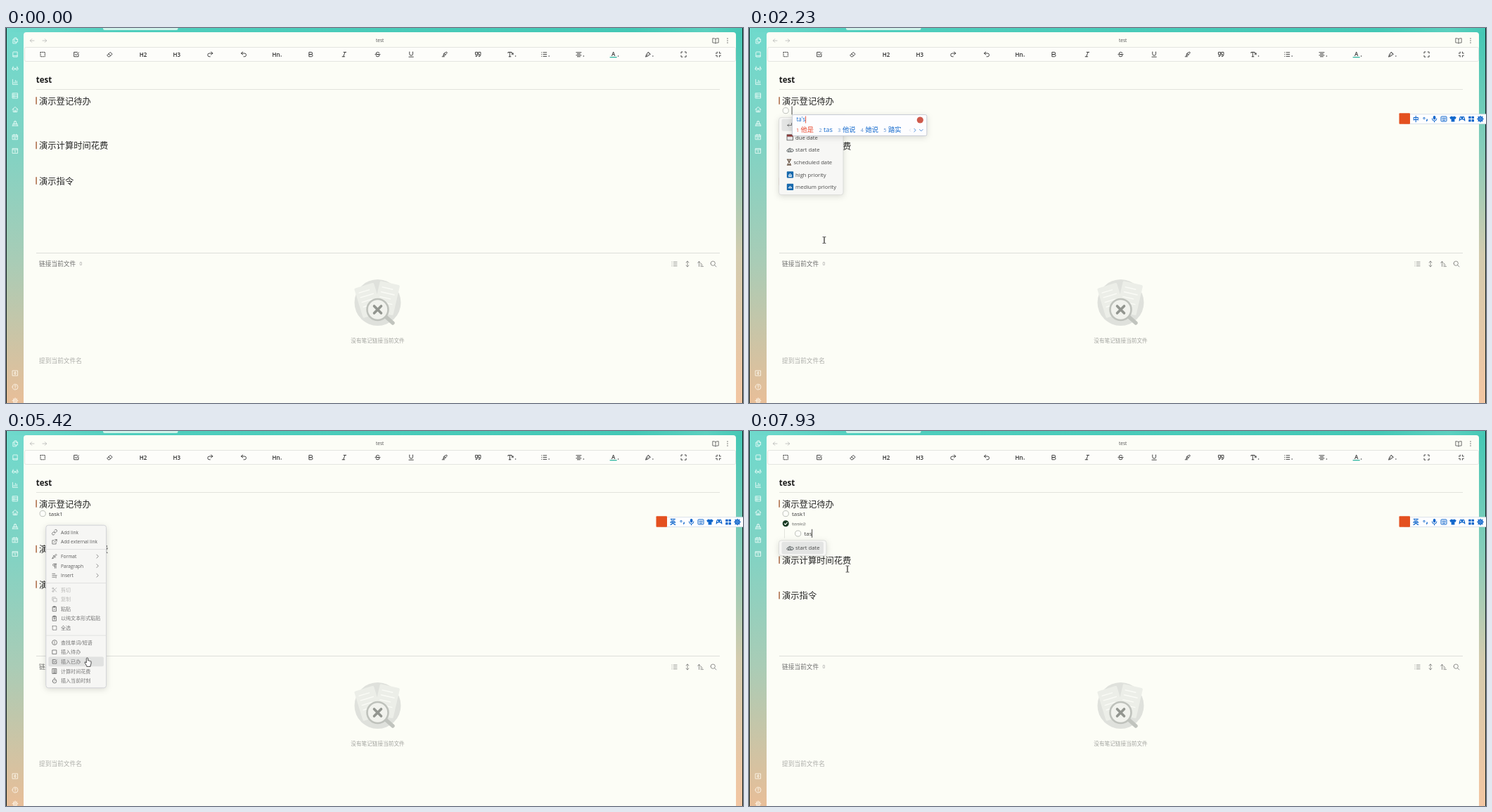
These frames come from a looping animation (1048 by 534 pixels, 7.99 s). An HTML page:

```html
<!DOCTYPE html>
<html lang="zh-CN">
<head>
<meta charset="utf-8">
<title>Note editor</title>
<style>
html, body { margin: 0; width: 100%; height: 100%; overflow: hidden; background: #fcfdf6; }
svg { display: block; width: 1048px; height: 534px; }
text { font-family: "Open Sans", "Noto Sans CJK SC", "Noto Sans CJK", sans-serif; white-space: pre; }
.pop { filter: drop-shadow(0 2px 4px #0002); }
</style>
</head>
<body>
<svg viewBox="0 0 1048 534">
  <defs>
    <linearGradient id="left" x2="0" y2="1">
      <stop offset="0" stop-color="#70d9cc"/><stop offset=".3" stop-color="#7fd3c4"/>
      <stop offset=".62" stop-color="#a9ccb6"/><stop offset="1" stop-color="#e8be98"/>
    </linearGradient>
    <linearGradient id="right" x2="0" y2="1">
      <stop offset="0" stop-color="#45c8b5"/><stop offset=".3" stop-color="#83cdba"/>
      <stop offset=".6" stop-color="#d3cbae"/><stop offset="1" stop-color="#f3c6a2"/>
    </linearGradient>
    <linearGradient id="top">
      <stop offset="0" stop-color="#70d9cc"/><stop offset=".16" stop-color="#4fcebd"/>
      <stop offset=".85" stop-color="#43c8b5"/><stop offset=".95" stop-color="#5bd0bf"/><stop offset="1" stop-color="#45c8b5"/>
    </linearGradient>
  </defs>
  <g id="page"></g>
  <g id="live"></g>
</svg>
<script>
const LOOP = 7990;
const INK = '#2b2b2b', BLUE = '#1268cc';
const page = document.getElementById('page'), live = document.getElementById('live');
const ruler = document.createElement('canvas').getContext('2d');

// Drawing helpers: every one returns SVG markup. Text is placed by its vertical centre.
const rect = (x, y, w, h, fill, extra = '') => `<rect x="${x}" y="${y}" width="${w}" height="${h}" fill="${fill}" ${extra}/>`;
const disc = (x, y, r, fill, extra = '') => `<circle cx="${x}" cy="${y}" r="${r}" fill="${fill}" ${extra}/>`;
const path = (d, stroke, width = 1, extra = '') =>
  `<path d="${d}" fill="none" stroke="${stroke}" stroke-width="${width}" stroke-linecap="round" stroke-linejoin="round" ${extra}/>`;
const text = (x, y, str, size, fill = INK, extra = '') =>
  `<text x="${x}" y="${y + size * .37}" font-size="${size}" fill="${fill}" ${extra}>${str}</text>`;
const icon = (d, x, y, size, stroke, width = 2, extra = '') =>
  `<g transform="translate(${x - size / 2} ${y - size / 2}) scale(${size / 24})">${path(d, stroke, width, extra)}</g>`;
const ring = (x, y, r) => `M${x - r} ${y}a${r} ${r} 0 1 0 ${2 * r} 0a${r} ${r} 0 1 0 ${-2 * r} 0`;
const textWidth = (str, size) => { ruler.font = `${size}px "Open Sans", sans-serif`; return ruler.measureText(str).width; };

// Icons on a 24 unit grid
const I = {
  files: 'M15 2h-6v15h12V8zM15 2v6h6M9 7H4v15h12v-5',
  book: 'M4 19V5a2 2 0 0 1 2-2h14v18H6a2 2 0 0 1 0-4h14',
  glasses: ring(6, 15, 4) + ring(18, 15, 4) + 'M10 14h4M2 14l3-8M22 14l-3-8',
  chart: 'M3 3v18h18M8 17v-4M13 17V6M18 17v-8',
  drawers: 'M3 3h18v18H3zM3 9h18M3 15h18M7 6h1M7 12h1M7 18h1',
  home: 'M2 12l10-9 10 9M5 10v11h14V10M10 21v-6h4v6',
  stamp: 'M2 21h20M4 21v-7h16v7M8 14V6h8v8M12 6V3M9 17v1M15 17v1',
  calendar: 'M3 5h18v16H3zM3 10h18M8 2v5M16 2v5M8 14h1M12 14h1M16 14h1M8 17h1M12 17h1',
  day: 'M3 4h18v17H3zM3 8h18M11 12l1-1v7',
  vault: 'M3 3h18v18H3z' + ring(12, 12, 3) + 'M12 6v3M12 15v3',
  help: ring(12, 12, 10) + 'M9 9a3 3 0 1 1 4 3q-1 .6-1 2M12 17v.5',
  gear: ring(12, 12, 3) + ring(12, 12, 7) + 'M12 2v3M12 19v3M2 12h3M19 12h3M5 5l2 2M17 17l2 2M5 19l2-2M17 7l2-2',
  back: 'M21 12H4M11 5l-7 7 7 7', forward: 'M3 12h17M13 5l7 7-7 7',
  openBook: 'M12 6q-3-2-10-2v15q7 0 10 2q3-2 10-2V4q-7 0-10 2v15',
  dots: 'M12 4v.2M12 12v.2M12 20v.2',
  square: 'M4 4h16v16H4z',
  check: 'M20 11v9H4V4h12M8 11l4 4L21 5',
  eraser: 'M3 15L14 4l7 7-9 9H8zM8 10l7 7',
  redo: 'M15 3l6 5-6 5M21 8H9a6 6 0 0 0 0 12h3', undo: 'M9 3L3 8l6 5M3 8h12a6 6 0 0 1 0 12h-3',
  bold: 'M7 4h7a4 4 0 0 1 0 8H7zM7 12h8a4 4 0 0 1 0 8H7z',
  italic: 'M10 4h9M5 20h9M15 4L9 20',
  strike: 'M18 7q-1-3-6-3t-6 4q0 2 4 4h4q4 1 4 4 0 4-6 4t-6-4M3 12h18',
  underline: 'M6 3v7a6 6 0 0 0 12 0V3M4 21h16',
  marker: 'M3 20h8M7 16l3-8 9-5 2 3-7 8zM10 9l5 5',
  quote: 'M3 4h7v9q0 6-6 7v-4q2 0 2-4H3zM14 4h7v9q0 6-6 7v-4q2 0 2-4h-3z',
  type: 'M3 7V4h13v3M9 4v16M6 20h7M16 13l5-5M21 13V8h-5',
  list: 'M9 5h12M9 12h12M9 19h12M3 5h.5M3 12h.5M3 19h.5',
  center: 'M3 5h18M7 10h10M3 15h18M7 20h10',
  bucket: 'M4 20l3-9 6-7 7 7-7 6zM7 17l5-5M13 4l7 7',
  expand: 'M3 8V3h5M16 3h5v5M21 16v5h-5M8 21H3v-5', shrink: 'M3 8h5V3M16 3v5h5M21 16h-5v5M8 21v-5H3',
  upDown: 'M12 2v20M7 7l5-5 5 5M7 17l5 5 5-5',
  sort: 'M7 21V3M2 8l5-5 5 5M13 11h3M13 16h6M13 21h9',
  search: ring(10, 10, 8) + 'M16 16l6 6',
  link: 'M10 13a5 5 0 0 0 7 0l4-4a5 5 0 0 0-7-7l-2 2M14 11a5 5 0 0 0-7 0l-4 4a5 5 0 0 0 7 7l2-2',
  external: 'M14 3h7v7M21 3L10 14M18 14v7H3V6h7',
  brush: 'M3 21q1-8 7-10l8-8 3 3-8 8q-2 6-10 7M7 8l9 9',
  pilcrow: 'M13 4v17M18 4v17M20 4H9a4 4 0 0 0 0 8h4',
  insert: 'M3 5h11M3 12h18M3 19h11M18 16v6',
  cut: ring(6, 6, 3) + ring(6, 18, 3) + 'M20 4L8 16M8 8l12 12',
  copy: 'M8 8h13v13H8zM4 16H3V3h13v1',
  paste: 'M5 4h14v18H5zM9 2h6v4H9zM9 14l2 2 4-4', pasteText: 'M5 4h14v18H5zM9 2h6v4H9zM9 11h6M12 11v7',
  info: ring(12, 12, 10) + 'M12 11v6M12 7v.5',
  calc: 'M4 2h16v20H4zM8 6h8M8 11h8M8 15h8M8 19h8',
  timer: ring(12, 14, 8) + 'M10 2h4M12 14l3-3',
  chevron: 'M8 3l9 9-9 9',
  enter: 'M21 4v9H4M9 8l-5 5 5 5',
  clouds: 'M3 18a4 4 0 0 1 3-7 6 6 0 0 1 11-1 4 4 0 0 1 4 8zM8 17a4 4 0 1 1 7 0',
  hourglass: 'M5 2h14M5 22h14M7 2q0 7 5 10-5 3-5 10M17 2q0 7-5 10 5 3 5 10M9 20h6M10 7h4'
};

function drawPage() {
  const out = [
    rect(0, 0, 1048, 534, 'url(#top)'), rect(0, 6, 60, 528, 'url(#left)'), rect(1000, 6, 48, 528, 'url(#right)'),
    rect(0, 0, 1, 534, '#10201e'), rect(1047, 0, 1, 534, '#10201e'),
    rect(138, -4, 106.5, 7, '#d0f3ea', 'rx="2.5"'),
    '<path d="M25 534V10a4 4 0 0 1 4-4H1034a4 4 0 0 1 4 4V534z" fill="#fcfdf6"/>',
    rect(26.5, 27.5, 1011, 20, '#fdfdfa', 'rx="2" stroke="#dfe0dc" stroke-width=".8"'),
    rect(43, 87, 972, 1, '#e2e3dd'), rect(43, 320, 972, 1, '#dddeda')
  ];
  ['files', 'book', 'glasses', 'chart', 'drawers', 'home', 'stamp', 'calendar', 'day'].forEach((name, i) =>
    out.push(icon(I[name], 13, 18 + 19.6 * i, 9.5, '#f3fffc', 2)));
  ['vault', 'help', 'gear'].forEach((name, i) => out.push(icon(I[name], 13, 491.5 + 19.6 * i, 9.5, '#fffaf0', 2)));

  out.push(icon(I.back, 37, 18, 8, '#aaa'), icon(I.forward, 55, 18, 8, '#aaa'),
    text(531.7, 18, 'test', 6.5, '#555', 'text-anchor="middle"'),
    icon(I.openBook, 1009, 18, 10, '#555'), icon(I.dots, 1026, 18, 9, '#444', 3.4));

  const tools = ['square', 'check', 'eraser', '=H2', '=H3', 'redo', 'undo', '=Hn', 'bold', 'italic', 'strike', 'underline',
    'marker', 'quote', 'type', 'list', 'center', '=A', 'bucket', 'expand', 'shrink'];
  const withMenu = ['=Hn', 'type', 'list', 'center', '=A', 'bucket'];
  tools.forEach((name, i) => {
    const x = 52.2 + 48.03 * i - (i < 15 ? .4 * i : 6 - (i - 15) * 1.2);
    const menu = withMenu.includes(name), cx = menu ? x - 1.5 : x;
    if (name[0] === '=') {
      const letters = name.slice(1);
      out.push(text(cx, letters === 'A' ? 36.8 : 37.6, letters, 8, INK, 'text-anchor="middle" font-weight="600"'));
      if (letters === 'A') out.push(rect(cx - 5, 41, 10, 1.3, '#2fb5a0'));
    } else out.push(icon(I[name], cx, 37.6, 9.5, INK, 2.2, name === 'square' ? 'stroke-dasharray="2.6 3.4"' : ''));
    if (menu) out.push(disc(cx + 7, 40, .8, '#444'));
  });

  out.push(text(42.7, 74, 'test', 11.5, '#1c1c1c', 'font-weight="700"'),
    text(47, 335.5, '链接当前文件', 8.7, '#707070'), text(104.5, 335.3, '0', 6.6, '#999'),
    text(528.5, 445, '没有笔记链接当前文件', 7.65, '#a3a4a0', 'text-anchor="middle"'),
    text(47, 473.5, '提到当前文件名', 8.7, '#adaeaa'));
  ['list', 'upDown', 'sort', 'search'].forEach((name, i) => out.push(icon(I[name], 950.5 + 18.5 * i, 336, 9.5, '#6a6a6a', 1.8)));

  // Empty-state picture
  const sheet = (x, y, turn) => `<g transform="translate(${x} ${y}) rotate(${turn})">` +
    rect(0, 0, 29, 44, '#eceee8', 'rx="2"') + [8, 15, 22, 29].map(v => path(`M5 ${v}h${v % 2 ? 19 : 15}`, '#fafbf6', 1.4)).join('') + '</g>';
  out.push(disc(528.5, 391, 33, '#dfe1dc'), sheet(495, 371, -17), sheet(532, 360, 13),
    path('M541 412l9 8', '#c1c4be', 5.5), disc(528.5, 401, 15, '#f1f2ed', 'stroke="#bfc2bc" stroke-width="2.6"'),
    path('M523.5 396l10 10M533.5 396l-10 10', '#92958f', 3.6));
  page.innerHTML = out.join('');
}

// Right-click menu: rows are [centre, label, icon, state]
const MENU = [
  [10, 'Add link', 'link'], [23.6, 'Add external link', 'external'],
  [44.3, 'Format', 'brush', 'sub'], [57.9, 'Paragraph', 'pilcrow', 'sub'], [71.5, 'Insert', 'insert', 'sub'],
  [92, '剪切', 'cut', 'off'], [105.6, '复制', 'copy', 'off'], [119, '粘贴', 'paste'], [132.6, '以纯文本形式粘贴', 'pasteText'], [146.3, '全选', 'square'],
  [167, '查找单词/短语', 'info'], [180.6, '插入待办', 'square'], [194.2, '插入已办', 'check'], [207.8, '计算时间花费', 'calc'], [221.3, '插入当前时刻', 'timer']
];
const rowAt = offset => MENU.findIndex(([y]) => Math.abs(y - offset) < 6.8);

function contextMenu(x, y, hoverRow) {
  let out = rect(x, y, 85.8, 231.6, '#f6f6f4', 'rx="3.5" stroke="#cfd0d4" stroke-width=".9" class="pop"');
  // Passing over disabled rows leaves the last submenu row lit
  const lit = hoverRow === 5 || hoverRow === 6 ? 3 : hoverRow;
  if (lit >= 0) out += rect(x + 3.6, y + MENU[lit][0] - 6.8, 78.5, 13.6, '#e1e2e1', 'rx="2"');
  for (const v of [34, 82, 156.5]) out += rect(x, y + v, 85.8, .8, '#dcdddb');
  MENU.forEach(([v, label, name, state], i) => {
    const latin = label < 'z', ink = state === 'off' ? '#b9b9b7' : latin ? '#5a5a5a' : '#777';
    out += icon(I[name], x + 12.2, y + v, 8.4, state === 'off' ? '#aaa' : '#555', 2, i === 9 ? 'stroke-dasharray="2.6 3.4"' : '');
    out += text(x + 21.2, y + v, label, latin ? 6.65 : 7.05, ink);
    if (state === 'sub') out += icon(I.chevron, x + 73.2, y + v, 6.5, '#555', 2.4);
  });
  return out;
}

const HINTS = ['', 'due date', 'start date', 'scheduled date', 'high priority', 'medium priority'];
function hints(typed, lineY) {
  const single = typed.length > 1, items = single ? [HINTS[2]] : HINTS;
  const top = lineY + 10, width = single ? 67.5 : 91.5;
  let out = rect(42.5, top, width, 17.7 * items.length + 4, '#f7f7f5', 'rx="3.5" stroke="#d6d7d5" stroke-width=".8" class="pop"');
  out += rect(46.5, top + 2, width - 8, 17.4, '#e3e4e3', 'rx="2.5"');
  items.forEach((label, i) => {
    const y = top + 10.8 + 17.65 * i;
    if (label === '') out += icon(I.enter, 57.5, y, 8, '#444');
    if (label === 'due date') out += rect(54, y - 4, 8.5, 8, '#e8e8ea', 'stroke="#444" stroke-width=".7"') + rect(54, y - 4, 8.5, 2.8, '#8c3a3a');
    if (label === 'start date') out += icon(I.clouds, 58.3, y, 10, '#3d4548', 2.2);
    if (label === 'scheduled date') out += icon(I.hourglass, 57, y, 9.5, '#57402f', 2.4);
    if (label.includes('priority'))
      out += rect(53.8, y - 4.6, 9.4, 9.2, '#1769ad', 'rx=".8"') +
        path(`M56.5 ${y + 1}l2-2.4 2 2.4z` + (label[0] === 'h' ? `M56.5 ${y + 2.6}h4` : ''), '#fff', 1);
    out += text(label[0] === 's' && label[1] === 'c' ? 63.4 : 66, y, label, 7.7, '#4a4a4a');
  });
  return out;
}

// Pinyin window: composition and its five candidates
function pinyin(letters, words) {
  let x = 67, row = '';
  words.forEach((word, i) => {
    const ink = i ? BLUE : '#e8492f';
    row += text(x, 145, i + 1, 7.2, i ? '#5b8fd0' : ink) + text(x + 6.6, 145, word, 9.25, ink);
    x += 14 + (word < 'z' ? textWidth(word, 9.25) : word.length * 9.25);
  });
  const right = x + 29, end = 67.5 + textWidth(letters, 8.1);
  return rect(61.5, 123.5, right - 61.5, 30, '#fdfdff', 'rx="2" stroke="#c3c8d2" stroke-width=".9" class="pop"') +
    text(67.5, 130.5, letters, 8.1, BLUE) + rect(end, 125.5, .9, 10, '#e8492f') + row +
    disc(right - 9.5, 131, 4.6, '#cf5a4c') +
    icon('M16 4l-7 8 7 8', right - 24, 145.5, 5, '#c3cfe0', 3) + icon(I.chevron, right - 17, 145.5, 6, BLUE, 3) +
    icon('M3 8l9 9 9-9', right - 8, 145.5, 6, BLUE, 3);
}

function imeBar(english) {
  const solid = (d, x) => `<path transform="translate(${x} 129.5)" d="${d}" fill="${BLUE}"/>`;
  let out = rect(932, 122.8, 118, 13.6, '#fefeff', 'stroke="#d3dbe6" stroke-width=".8"') + rect(924.5, 121.3, 15.5, 15.5, '#e4501f', 'rx="1"');
  out += text(948.3, 129.5, english ? '英' : '中', 8.6, BLUE, 'text-anchor="middle" font-weight="700"');
  out += disc(960, 128.5, 1.2, 'none', `stroke="${BLUE}" stroke-width=".9"`) + path('M964.2 130.2q.4 1-.6 2', BLUE, 1.4);
  out += rect(972.8, 125, 3.6, 5.6, BLUE, 'rx="1.8"') + path('M971.3 129a3.3 3.3 0 0 0 6.6 0M974.6 132.4v1.6', BLUE, 1);
  out += rect(984, 126, 8, 7, 'none', `rx="1" stroke="${BLUE}"`) + path('M985.8 128.2h4.6M985.8 129.8h4.6M986.5 131.4h3', BLUE, .8);
  out += solid('M-2-4L-4.8-2.2-3.4.6-2.4 0V4H2.4V0L3.4.6 4.8-2.2 2-4Q0-2.4-2-4z', 1001);
  out += solid('M-2.8-3.6H2.8Q4.8-1 4.2 3.6L1.8 1H-1.8L-4.2 3.6Q-4.8-1-2.8-3.6z', 1014) + disc(1012, 128.6, 1, '#fff') + disc(1016, 128.6, 1, '#fff');
  for (const [dx, dy] of [[0, 0], [4.4, 0], [0, 4.4], [4.4, 4.4]]) out += rect(1023.2 + dx, 125.7 + dy, 3.4, 3.4, BLUE, 'rx=".6"');
  return out + icon(I.gear, 1040, 129.5, 10, BLUE, 3.4);
}

// Pointer path: [time, x, y]
const MOVES = [[70, 250, 505], [480, 45, 121], [600, 45, 121], [720, 60, 121], [860, 62, 125], [1120, 99.5, 225.5], [1380, 107, 302],
  [2650, 107, 302], [3330, 212, 250], [3850, 44, 134], [4050, 44, 134], [4260, 57, 133], [4640, 57, 134], [5380, 115.5, 323],
  [5900, 115.5, 326], [6250, 174.5, 320], [6700, 174.5, 320], [7300, 140, 196.5], [LOOP, 140, 196.5]];
const CLICKS = [[500, 45, 121], [740, 60, 121], [1520, 107, 302], [3900, 44, 134], [4420, 56, 133], [5580, 115.5, 326]];
const MENUS = [[800, 1580, 60.5, 121.4], [4540, 5640, 56.8, 134.2]];

function pointerAt(t) {
  const i = Math.max(1, MOVES.findIndex(m => m[0] > t));
  const [t0, x0, y0] = MOVES[i - 1], [t1, x1, y1] = MOVES[i];
  const p = (t - t0) / (t1 - t0), e = p * p * (3 - 2 * p);
  return [x0 + (x1 - x0) * e, y0 + (y1 - y0) * e];
}

function pointer(x, y, kind) {
  if (kind === 'beam') return path(`M${x - 2} ${y - 4.5}h1.5q.5 0 .5.5v8q0 .5-.5.5h-1.5M${x + 2} ${y - 4.5}h-1.5q-.5 0-.5.5v8q0 .5.5.5h1.5`, '#333', .8);
  const d = kind === 'hand'
    ? 'M0 0q-1.2 0-1.2 1.2V7L-2.6 5.8q-1.2 0-.8 1.3L-.8 11.3V12.3H4.6V11Q5.8 9 5.6 5.2q-.6-1-1.5-.4Q3.4 3.7 2.5 4.3 2 3.5 1.2 3.9V1.2Q1.2 0 0 0z'
    : 'M0 0V9L2 7.2 3.6 10.8 5 10.2 3.4 6.7 6 6.5z';
  return `<path transform="translate(${x} ${y})" d="${d}" fill="#fff" stroke="#222" stroke-width=".8"/>`;
}

// Typing: number of letters already entered at given times
const typed = (word, times, t) => word.slice(0, times.filter(v => t >= v).length);
const COMPOSING = [
  [1900, 't', ['他', '天', '她', '听', '太']], [2040, 'ta', ['他', '她', '它', 'ta', '塔']],
  [2170, "ta's", ['他是', 'tas', '他说', '她说', '踏实']], [2400, "ta's'k", ['他是可', 'task', '他说可', '她说可', '踏实']]
];

function todoLine(x, y, word, done) {
  const width = textWidth(word, 8);
  return (done
    ? disc(x, y, 4.5, '#173a22') + path(`M${x - 2} ${y}l1.5 1.6 2.6-3`, '#fff', 1.1)
    : disc(x, y, 4.1, '#fdfef9', 'stroke="#aeb0ab" stroke-width=".8"')) +
    text(x + 8.8, y + .2, word, 8, done ? '#a5a7a2' : '#3c3c3c') +
    (done && word ? rect(x + 8.8, y + .3, width, .8, '#9a9c97') : '');
}
const caret = (x, y) => rect(x, y - 6, .9, 12, '#333');

function draw(t) {
  const out = [];
  const first = t >= 1590, second = t >= 5680, third = t >= 6900, indented = t >= 7200;
  const words = [
    typed('task1', [2760, 2870, 2980, 3100, 3220], t),
    typed('task2', [6100, 6230, 6400, 6540, 6690], t),
    typed('tas', [7650, 7780, 7900], t)
  ];

  const shift = (first ? 1 : 0) + (second ? 1.4 : 0) + (third ? 14.2 : 0);
  [['演示登记待办', 104], ['演示计算时间花费', 167.6 + shift], ['演示指令', 218 + shift]].forEach(([title, y]) =>
    out.push(rect(42.3, y - 5.8, 1.6, 10.5, '#b0714e'), text(47, y, title, 12.3, '#262626')));

  const indent = indented ? 17.5 : 0;
  if (first) out.push(todoLine(52.2, 117.6, words[0], false));
  if (second) out.push(todoLine(52.2, 131.8, words[1], true));
  if (third) out.push(todoLine(52.2 + indent, 146, words[2], false));
  if (indented) out.push(rect(50, 139.5, .8, 13, '#dcddd8'));

  if (t >= 560 && t < 800) out.push(caret(42.6, 131));
  if (t >= 3900 && t < 4540) out.push(caret(42.6, 131));
  const active = third ? 2 : second ? 1 : first && t < 3380 ? 0 : -1;
  if (active >= 0) {
    const word = words[active], y = 117.4 + 14.2 * active;
    out.push(caret(60.6 + (active === 2 ? indent : 0) + textWidth(word, 8), y));
    const opensAt = [1730, 5800, 7300][active];
    if (t >= opensAt && word.length < 4) out.push(hints(word, y));
  }

  if (t >= 480) out.push(imeBar(t >= 2640));
  const composing = COMPOSING.filter(c => t >= c[0]).pop();
  if (composing && t < 2600) out.push(pinyin(composing[1], composing[2]));

  const menu = MENUS.find(m => t >= m[0] && t < m[1]);
  const [px, py] = pointerAt(t);
  let row = -1;
  if (menu) {
    row = rowAt(py + 2 - menu[3]);
    out.push(contextMenu(menu[2], menu[3], row));
  }
  for (const [start, x, y] of CLICKS) {
    const age = (t - start) / 160;
    if (age >= 0 && age < 1) out.push(disc(x, y, 6 + 3 * age, '#f04a4a', `opacity="${.95 - .4 * age}"`));
  }
  if (t >= 70) {
    const disabled = row < 0 || MENU[row][3] === 'off';
    out.push(pointer(px, py, menu ? (disabled ? 'arrow' : 'hand') : py < 312 ? 'beam' : 'arrow'));
  }
  live.innerHTML = out.join('');
}

function tick() {
  draw(performance.now() % LOOP);
  requestAnimationFrame(tick);
}
drawPage();
tick();
</script>
</body>
</html>
```
